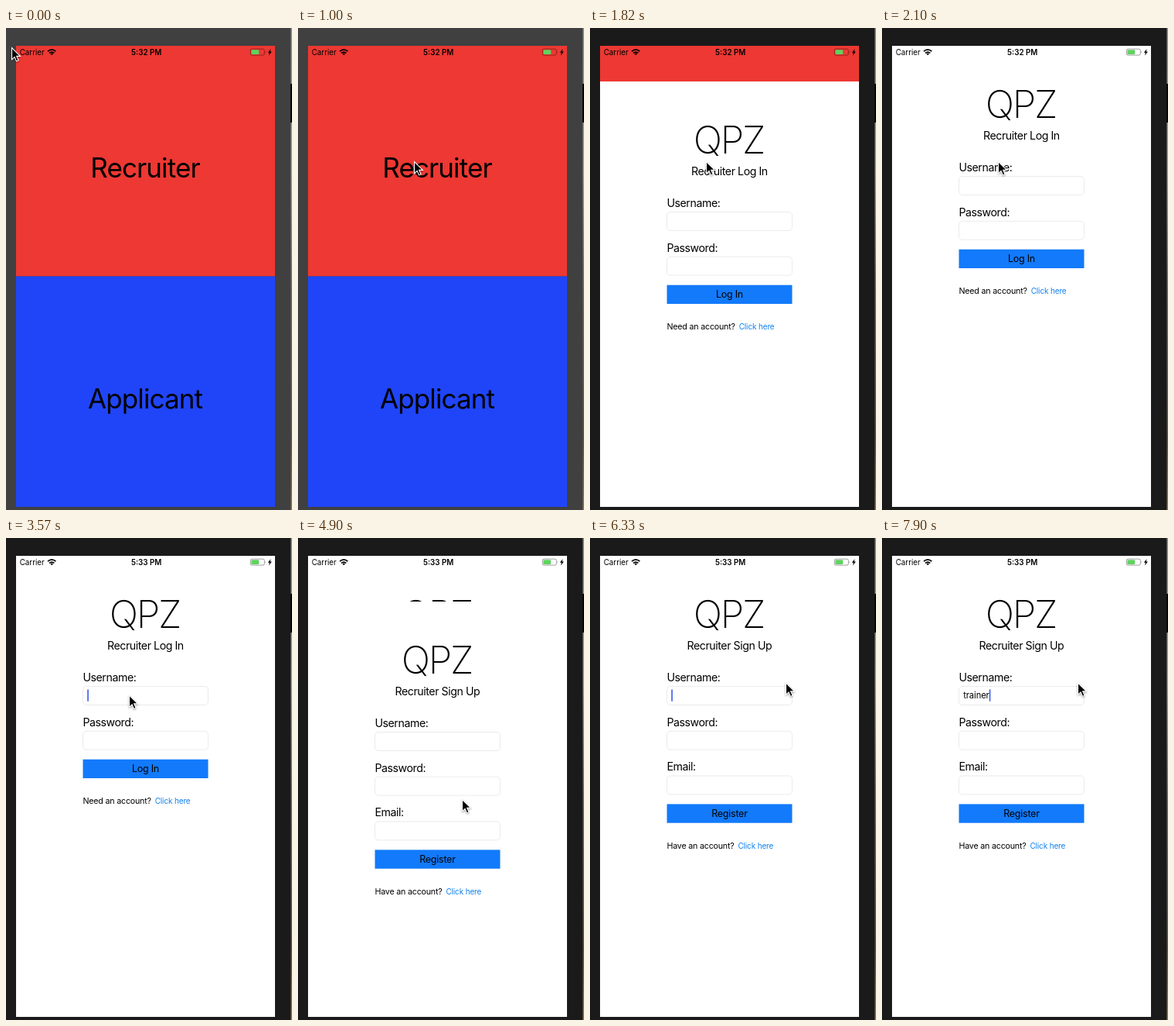
An HTML page for the animation above (8 s loop, 370 px wide and 622 px high).

```html
<!DOCTYPE html>
<html lang="en">
<head>
<meta charset="utf-8">
<style>
  html, body { margin: 0; width: 100%; height: 100%; overflow: hidden; background: #1a1a1a; }
  svg { display: block; font-family: Inter, sans-serif; }
  .role { font-size: 35px; letter-spacing: -.9px; text-anchor: middle; }
  .logo { font-size: 49.5px; font-weight: 200; letter-spacing: -2.2px; text-anchor: middle; }
  .label { font-size: 14.2px; letter-spacing: -.45px; }
  .mid { text-anchor: middle; }
  .button { font-size: 12.5px; letter-spacing: -.25px; text-anchor: middle; }
  .hint { font-size: 10.7px; letter-spacing: -.2px; }
  .link { font-size: 10px; letter-spacing: -.15px; fill: #0f80ee; }
  .typed { font-size: 11.2px; letter-spacing: -.1px; }
  .caret { fill: #4565e8; }
  .field { fill: #fff; stroke: #ebebeb; }
  .status { font-size: 9.8px; }
</style>
</head>
<body>
<svg width="370" height="622" viewBox="0 0 370 622">
  <defs>
    <clipPath id="screen"><rect x="13" y="23" width="335" height="595"/></clipPath>
    <linearGradient id="desktop" x2="0" y2="1">
      <stop offset="0" stop-color="#8d959d"/>
      <stop offset=".3" stop-color="#a5a3a0"/>
      <stop offset=".55" stop-color="#77706b"/>
      <stop offset=".85" stop-color="#6a5645"/>
      <stop offset="1" stop-color="#a07a45"/>
    </linearGradient>
  </defs>
  <rect id="bezel" width="370" height="622"/>
  <rect x="368.5" width="1.5" height="622" fill="url(#desktop)"/>
  <rect x="368" y="72" width="2" height="50" fill="#050505"/>
  <g clip-path="url(#screen)">
    <rect x="13" y="23" width="335" height="297.5" fill="#ed3833"/>
    <rect x="13" y="320.5" width="335" height="297.5" fill="#2045f8"/>
    <text class="role" x="180" y="193">Recruiter</text>
    <text class="role" x="180" y="490.5">Applicant</text>
    <g id="login"></g>
    <g id="signup"></g>
  </g>
  <g class="status">
    <text x="17.7" y="35">Carrier</text>
    <text id="clock" class="mid" x="181.7" y="35" font-weight="600"></text>
    <g fill="none" stroke="#000" stroke-width="1.7">
      <path d="M54 30.2q5.2-4.6 10.4 0M56 32.4q3.2-2.7 6.4 0"/>
      <path d="M57.4 33.2q1.8-1.4 3.6 0l-1.8 2z" fill="#000" stroke="none"/>
    </g>
    <rect x="316.3" y="27.1" width="18" height="8" rx="2" fill="none" stroke="#000" stroke-opacity=".42" stroke-width=".9"/>
    <path d="M335.3 29.6q1.6 1.5 0 3z" fill-opacity=".42"/>
    <rect x="317.4" y="28.2" width="9.8" height="5.8" rx=".8" fill="#5fd35f"/>
    <path d="M342.6 27l-3.8 4.7h2.1l-1 3.8 4-4.9h-2.2z"/>
  </g>
  <path id="cursor" d="M0 0V15.2L3.6 11.9 6 17.4 8.6 16.3 6.2 10.9H11Z" stroke="#fff" stroke-width="1.1"
        style="filter: drop-shadow(0 1px 1px #0006)"/>
</svg>
<script>
const $ = id => document.getElementById(id);
const LOOP = 8000, SCREEN_HEIGHT = 595, SLIDE_MS = 520, ROW = 57.7;

function form(title, labels, action, hint, link, linkX) {
  const bottom = 184.8 + labels.length * ROW;
  const rows = labels.map((label, i) => `
    <text class="label" x="99.4" y="${184.8 + i * ROW}">${label}:</text>
    <rect class="field" x="99.5" y="${191.5 + i * ROW}" width="162" height="24" rx="4.5"/>`);
  return `<rect x="13" y="23" width="335" height="595" fill="#fff"/>
    <text class="logo" x="179.5" y="116">QPZ</text>
    <text class="label mid" x="180.4" y="144.3">${title}</text>
    ${rows.join('')}
    <rect x="99.5" y="${bottom - 14.5}" width="162" height="24.3" fill="#127afb"/>
    <text class="button" x="180.4" y="${bottom + 2}">${action}</text>
    <text class="hint" x="99.4" y="${bottom + 42.8}">${hint}</text>
    <text class="link" x="${linkX}" y="${bottom + 42.8}">${link}</text>
    <text class="typed" x="105.2" y="207"></text>
    <rect class="caret" x="105.2" y="195.5" width="1.7" height="15.2"/>`;
}
$('login').innerHTML = form('Recruiter Log In', ['Username', 'Password'], 'Log In', 'Need an account?', 'Click here', 192.7);
$('signup').innerHTML = form('Recruiter Sign Up', ['Username', 'Password', 'Email'], 'Register', 'Have an account?', 'Click here', 191.4);

const loginCaret = document.querySelector('#login .caret');
const caret = document.querySelector('#signup .caret');
const typed = document.querySelector('#signup .typed');

const word = 'trainer';
const keyTimes = [6840, 7020, 7200, 7430, 7610, 7720, 7900];

// time, x, y of the pointer tip
const pointer = [
  [0, 7.5, 25.5], [260, 7.5, 25.5], [1000, 150.5, 172.5], [2640, 150.5, 172.5], [2800, 151.5, 178],
  [2930, 151.5, 178], [3270, 159.5, 203], [4060, 159.5, 203], [4560, 212.5, 337.5], [5200, 212.5, 337.5],
  [5690, 165.5, 202], [5770, 165.5, 202], [5810, 165.5, 201], [6110, 165.5, 201], [6330, 253.5, 187], [LOOP, 253.5, 187]
];

const clamp = v => Math.min(1, Math.max(0, v));
const smooth = v => v * v * (3 - 2 * v);

// cubic-bezier(.38, .7, .125, 1), solved by bisection
function sheetEase(x) {
  const bezier = (s, a, b) => 3 * (1 - s) ** 2 * s * a + 3 * (1 - s) * s * s * b + s ** 3;
  let low = 0, high = 1;
  for (let i = 0; i < 20; i++) {
    const s = (low + high) / 2;
    if (bezier(s, .38, .125) < x) low = s; else high = s;
  }
  return bezier(high, .7, 1);
}

function slide(id, t, start) {
  const progress = clamp((t - start) / SLIDE_MS);
  const offset = progress <= 0 ? SCREEN_HEIGHT : progress >= 1 ? 0 : SCREEN_HEIGHT * (1 - sheetEase(progress));
  $(id).setAttribute('transform', `translate(0 ${Math.round(offset)})`);
}

function movePointer(t) {
  const i = pointer.findIndex(p => p[0] > t);
  const [t0, x0, y0] = pointer[i - 1], [t1, x1, y1] = pointer[i];
  const k = smooth((t - t0) / (t1 - t0));
  $('cursor').setAttribute('transform', `translate(${x0 + (x1 - x0) * k} ${y0 + (y1 - y0) * k})`);
}

function draw(t) {
  $('bezel').setAttribute('fill', t < 1420 ? '#404040' : '#1a1a1a');
  $('clock').textContent = t < 2980 ? '5:32 PM' : '5:33 PM';
  slide('login', t, 1570);
  slide('signup', t, 4671);
  movePointer(t);

  loginCaret.setAttribute('opacity', t >= 3570 && t < 4100 ? 1 : 0);
  const count = keyTimes.filter(k => t >= k).length;
  typed.textContent = word.slice(0, count);
  caret.setAttribute('x', 105.2 + (count ? typed.getComputedTextLength() : 0));
  caret.setAttribute('opacity', count ? 1 : t < 5930 ? 0 : 1 - clamp((t - 6440) / 170));
}

function frame() {
  draw(performance.now() % LOOP);
  requestAnimationFrame(frame);
}
frame();
</script>
</body>
</html>
```
